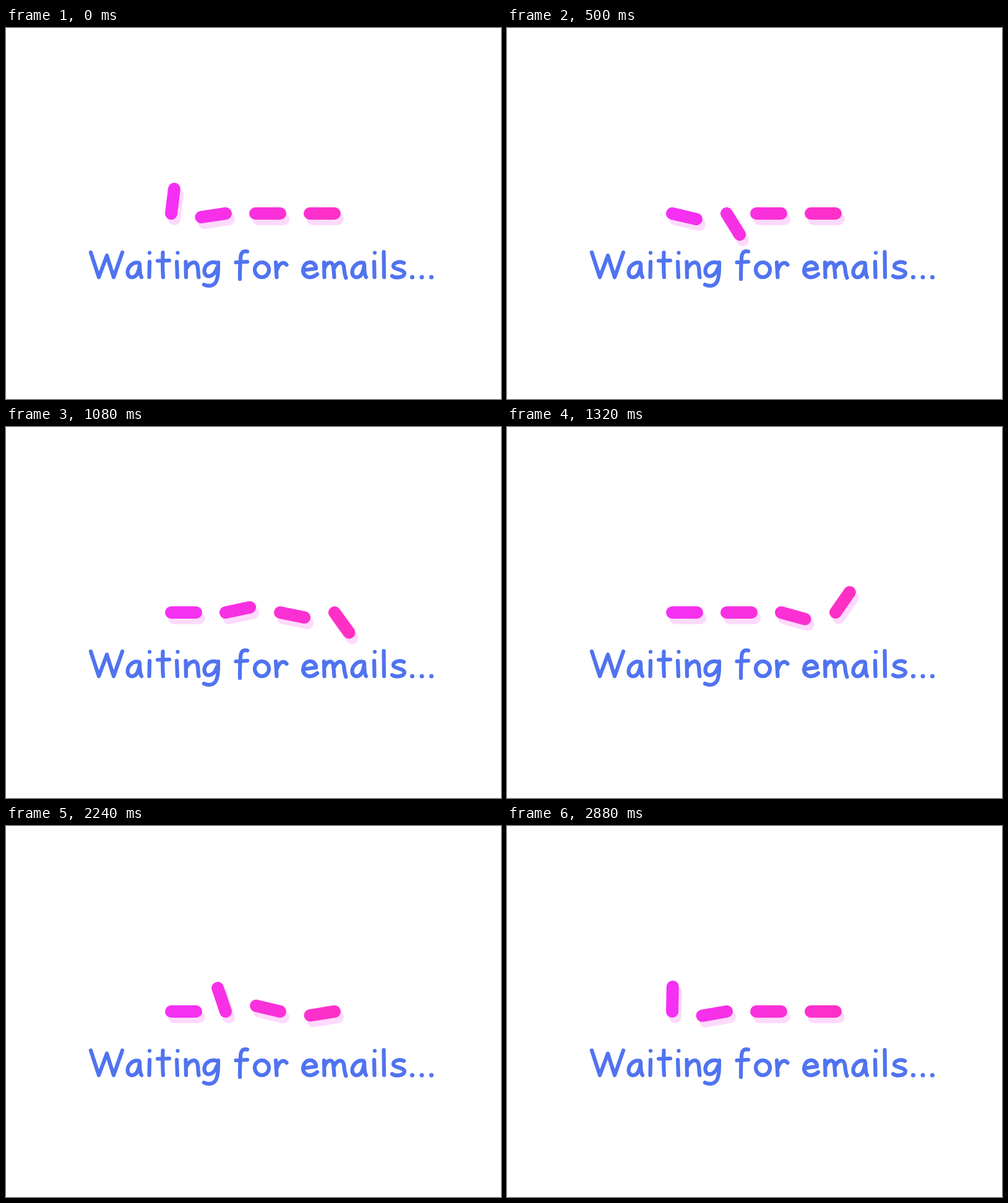
An HTML page for the animation above (2.9 s loop, 800 by 600 pixels).

```html
<!DOCTYPE html>
<html lang="en">
<head>
<meta charset="utf-8">
<title>Waiting for emails...</title>
<style>
  html, body { margin: 0; width: 100%; height: 100%; overflow: hidden; background: #fff; }
  svg { display: block; width: 800px; height: 600px; fill: none; stroke-linecap: round; stroke-linejoin: round; }
  #pills { stroke: url(#tint); stroke-width: 20; filter: drop-shadow(5px 9px .5px rgba(245, 50, 240, .18)); }
  #label { stroke: #5073f0; stroke-width: 6.2; }
  text { font: 60px "Comic Sans MS", cursive, sans-serif; }
</style>
</head>
<body>
<svg viewBox="0 0 800 600">
  <defs>
    <linearGradient id="tint" gradientUnits="userSpaceOnUse" x1="257" x2="561" y1="0" y2="0">
      <stop stop-color="#f430f6"/>
      <stop offset="1" stop-color="#ff30c2"/>
    </linearGradient>
  </defs>
  <g id="pills"></g>
  <text x="134" y="405">Waiting for emails...</text>
  <!-- Handwritten lettering over the selectable text -->
  <g id="label" aria-hidden="true">
    <path d="M137 363L150 403L163 368L174 403L188 363"/>
    <path id="a" d="M215 380C205 377 196.500 387 196.500 395C196.500 401 201 404 205 403C211 402 215 394 216 382C216 390 216 399 219 403"/>
    <path d="M232 363.500v.1M232 378L231.500 403"/>
    <path d="M245 376.500L264 376M253.500 363C253 377 253 392 254 403"/>
    <path d="M277.500 363.500v.1M276 378L277 403"/>
    <path d="M290.500 378L291 403M291 390C296 380 305 375 309 383C311 389 310 397 311.500 403"/>
    <path d="M341 380C330 376 320.500 384 320.500 393C321 405 335 405 341 388M343 379C343 392 343 404 339 411C335 418 326 418 320 415"/>
    <path d="M390 361.500C382 360 379 364 379 374C378 385 378 396 378 406M371.500 379L390 378"/>
    <ellipse cx="413.500" cy="391" rx="11.500" ry="12"/>
    <path d="M436 379L437.500 403M438 391C441 381 449 376 453.500 383"/>
    <path d="M482 391.500L501 389C501 381 494 378 490 379C483 380 480 387 480 393C481 401 488 404 493 403C498 402 501 400 503 398"/>
    <path d="M514 379L514.500 403M514.500 389C519 378 527 376 529 385L530.500 403M530 389C535 378 544 376 546 386C547 393 547 399 549.500 404"/>
    <use href="#a" x="363"/>
    <path d="M596 363.500v.1M595 378L595.500 403M610.500 362L611 403"/>
    <path d="M643 380C636 376 626 380 626 385C626 391 644 390 644 397C643 404 629 405 624 401"/>
    <path d="M656.500 403v.1M672 403v.1M687.500 403v.1" stroke-width="7"/>
  </g>
</svg>
<script>
const LOOP = 2900, HALF = LOOP / 2, ARM = 40, Y = 300;
const pivots = [267, 355, 443, 531];
const group = document.getElementById('pills');
const pills = pivots.map(x => {
  const line = document.createElementNS('http://www.w3.org/2000/svg', 'line');
  line.setAttribute('x1', x);
  line.setAttribute('y1', Y);
  return group.appendChild(line);
});

// CSS-style cubic Bezier easing, solved by bisection
function bezier(x1, y1, x2, y2) {
  const at = (s, a, b) => 3 * (1 - s) * s * ((1 - s) * a + s * b) + s ** 3;
  return x => {
    if (x >= 1) return 1;
    let lo = 0, hi = 1;
    for (let i = 0; i < 24; i++) {
      const mid = (lo + hi) / 2;
      if (at(mid, x1, x2) < x) lo = mid; else hi = mid;
    }
    return at(lo, y1, y2);
  };
}

const flip = bezier(.175, .87, .32, 1.3);
const spin = bezier(.05, .61, .75, 1.25);
const since = (t, start) => ((t - start) % LOOP + LOOP) % LOOP;

// End pill: one full clockwise turn per loop
const outer = t => 360 * spin(since(t, 2406) / 1325);

// Middle pill: two half turns counterclockwise, over the top and back underneath
function inner(t) {
  const under = since(t, 345), over = since(t, 2108);
  return under < over ? -180 - 180 * flip(under / 900) : -180 * flip(over / 900);
}

// The right half mirrors the left, half a loop later
const mirror = turn => t => 180 - turn(t - HALF);
const turns = [outer, inner, mirror(inner), mirror(outer)];

function draw(t) {
  pills.forEach((pill, i) => {
    const angle = turns[i](t) * Math.PI / 180;
    pill.setAttribute('x2', pivots[i] + ARM * Math.cos(angle));
    pill.setAttribute('y2', Y + ARM * Math.sin(angle));
  });
}

let begin;
function tick(now) {
  begin ??= now;
  draw((now - begin) % LOOP);
  requestAnimationFrame(tick);
}
draw(0);
requestAnimationFrame(tick);
</script>
</body>
</html>
```
